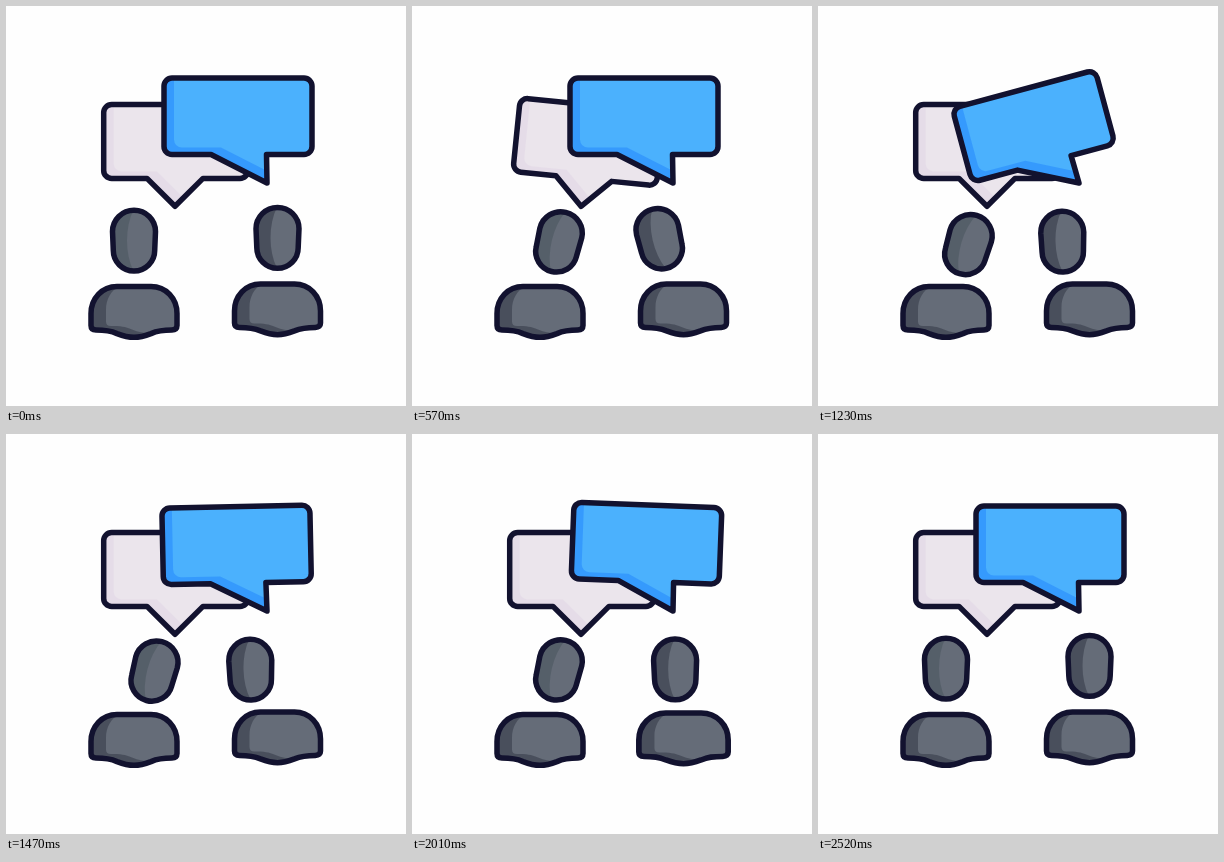
Animation, 400 px wide and 400 px high, one loop 4.55 s. Source, as an HTML page with a canvas:

```html
<!DOCTYPE html>
<html lang="en">
<head>
<meta charset="utf-8">
<title>Conversation</title>
<style>
html, body { margin: 0; width: 100%; height: 100%; overflow: hidden; background: #fefefe; }
canvas { display: block; width: 400px; height: 400px; }
</style>
</head>
<body>
<canvas id="stage"></canvas>
<script>
const SIZE = 400, LOOP = 4550, STEP = 30, END = 2520;
const PAPER = '#fefefe', INK = '#12122f';
const BEAT = 235;                    // half a bubble swing
const REPLY = 1110;                  // the front bubble answers
const RIGHT_BACK = 1860, LEFT_BACK = 2010;

const canvas = document.getElementById('stage');
const ctx = canvas.getContext('2d');
const ratio = window.devicePixelRatio || 1;
canvas.width = canvas.height = SIZE * ratio;

function bubble(left, top, right, bottom, tail, shade, lit) {
  const outline = new Path2D(), r = 8;
  const [from, tipX, tipY, to] = tail;
  outline.moveTo(left + r, top);
  outline.arcTo(right, top, right, bottom, r);
  outline.arcTo(right, bottom, left, bottom, r);
  outline.lineTo(to, bottom);
  outline.lineTo(tipX, tipY);
  outline.lineTo(from, bottom);
  outline.arcTo(left, bottom, left, top, r);
  outline.arcTo(left, top, right, top, r);
  outline.closePath();

  const light = new Path2D();
  light.addPath(outline, new DOMMatrix().translate(10, -7));
  light.rect(to, top, right - to, bottom - top);
  return { outline, light, shade, lit, tipX, tipY };
}

const backBubble = bubble(97.7, 98.5, 242, 172.4, [141, 169, 200.3, 197], '#e5dce8', '#ebe5ec');
const frontBubble = bubble(158, 72, 306, 148.5, [205, 261, 177, 260.5], '#359afd', '#4bb1fd');

const headShape = new Path2D('M-21.5 -9A21.5 21.3 0 0 1 21.5 -9L20.7 10A20.7 20.5 0 0 1 -20.7 10Z');
const headLight = new Path2D();
headLight.ellipse(14, 0, 21, 42, 0, 0, Math.PI * 2);

const bustShape = new Path2D('M-17 -52H17C32 -52 43 -40 43 -25V-13Q43 -8.5 38 -8.5C28 -8.5 24 -8 17 -5C4 0 -4 0 -17 -5C-24 -8 -28 -8.5 -38 -8.5Q-43 -8.5 -43 -13V-25C-43 -40 -32 -52 -17 -52Z');
const bustLight = new Path2D();
bustLight.addPath(bustShape, new DOMMatrix().translate(15, -4));

const head = shade => ({ outline: headShape, light: headLight, shade, lit: '#656c78' });
const leftHead = head('#555f69'), rightHead = head('#494f5c');
const bust = { outline: bustShape, light: bustLight, shade: '#494f5c', lit: '#656c78' };

const clamp = k => Math.min(1, Math.max(0, k));
const smooth = k => (1 - Math.cos(Math.PI * clamp(k))) / 2;
const ramp = (t, start, length) => smooth((t - start) / length);
const bell = (t, start, length) => Math.sin(Math.PI * clamp((t - start) / length)) ** 2;

// Bubble angle: alternating swings that shrink by the same amount each beat.
function swing(t) {
  const beat = Math.max(0, t) / BEAT, i = Math.floor(beat);
  const peak = n => n < 1 || n > 4 ? 0 : (27 - 6 * n) * (n % 2 ? -1 : 1);
  const k = i ? smooth(beat - i) : Math.sin(Math.PI / 2 * beat);
  return peak(i) + (peak(i + 1) - peak(i)) * k;
}

// Shoulders widen and settle whenever the head moves.
function pulse(t, start) {
  const u = t - start;
  return u > 0 && u < 480 ? 1.5 * Math.sin(Math.PI * u / 240) * Math.exp(-u / 300) : 0;
}

function draw(shape, x, y, angle = 0, widen = 1) {
  ctx.save();
  ctx.translate(x, y);
  ctx.rotate(angle * Math.PI / 180);
  ctx.scale(widen, 1);
  if (shape.tipX) ctx.translate(-x, -y);
  ctx.fillStyle = shape.shade;
  ctx.fill(shape.outline);
  ctx.save();
  ctx.clip(shape.outline);
  ctx.fillStyle = shape.lit;
  ctx.fill(shape.light);
  ctx.restore();
  ctx.stroke(shape.outline);
  ctx.restore();
}

const drawBubble = (shape, t) => draw(shape, shape.tipX, shape.tipY, swing(t));

function drawBust(x, y, t, back) {
  const p = pulse(t, 0) + pulse(t, back);
  draw(bust, x, y + 1.2 * p, 0, 1 + 0.045 * p);
}

function drawHeads(t) {
  const dip = back => 2.5 * (bell(t, 0, 280) + bell(t, back, 280));
  const lean = back => ramp(t, 0, 240) - ramp(t, back, 240);

  const left = lean(LEFT_BACK), nod = bell(t, 700, 1000);
  draw(leftHead, 128 + 18.7 * left + 3.5 * nod,
    234.5 + 1.3 * left + 2.7 * nod + dip(LEFT_BACK), 13.5 * left + 3 * nod);

  const right = lean(RIGHT_BACK), turn = ramp(t, 600, 600) * right;
  draw(rightHead, 271.5 - 24 * right - 3 * turn,
    231.7 + 0.9 * right + 3 * turn + dip(RIGHT_BACK), 11.5 * turn - 13 * right);
}

function render(t) {
  ctx.setTransform(ratio, 0, 0, ratio, 0, 0);
  ctx.fillStyle = PAPER;
  ctx.fillRect(0, 0, SIZE, SIZE);
  ctx.strokeStyle = INK;
  ctx.lineWidth = 5.5;
  ctx.lineJoin = 'round';

  drawBubble(backBubble, t);
  drawBubble(frontBubble, t - REPLY);
  drawBust(128, 332.6, t, LEFT_BACK);
  drawBust(271.5, 329.9, t, RIGHT_BACK);
  drawHeads(t);
}

function tick() {
  const t = Math.floor(performance.now() % LOOP / STEP) * STEP;
  render(t >= END ? LOOP : t);
  requestAnimationFrame(tick);
}
tick();
</script>
</body>
</html>
```
